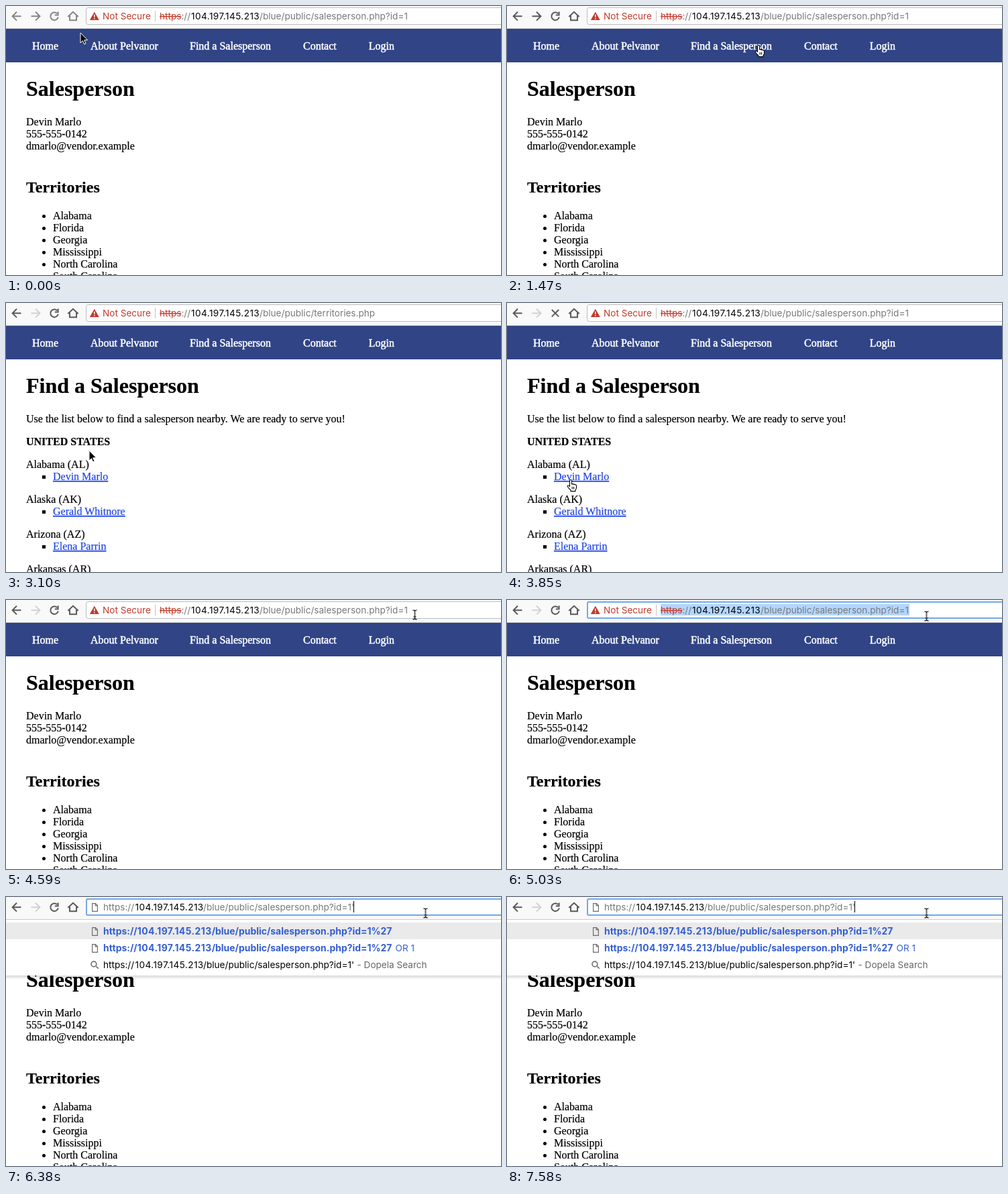
An HTML page for the animation above (8000 ms loop, 738 by 401 pixels).

```html
<!DOCTYPE html>
<html lang="en">
<head>
<meta charset="utf-8">
<title>Find a Salesperson</title>
<style>
html, body { margin: 0; width: 100%; height: 100%; overflow: hidden; background: #fff; }
svg { display: block; width: 738px; height: 401px; }

.page { font: 16px "Liberation Serif", "Times New Roman", serif; }
.page text { stroke: #000; stroke-width: .2px; }
.h1 { font-size: 32px; font-weight: bold; }
.h2 { font-size: 24px; font-weight: bold; }
.page .nav text { fill: #fff; stroke: #fff; stroke-width: .5px; }
.page .link { fill: #2145e8; stroke: #2145e8; text-decoration: underline; }
.bar { font: 13.6px Inter, "Open Sans", sans-serif; }
.ip { letter-spacing: .43px; }
.grey { fill: #787878; }
.red { fill: #c4392b; }
.strike { text-decoration: line-through; }
.match { font-size: 13.93px; font-weight: 700; }
.blue { fill: #345fd2; }
.icon { fill: none; stroke: #5a5a5a; stroke-width: 2; }
.thin { fill: none; stroke: #6e6e6e; stroke-width: 1.2; }

/* Timed parts: hidden unless a keyframe shows them */
.t { visibility: hidden; animation: 8s step-end infinite; }
.dim { animation: dim 8s step-end infinite; }
#finder { animation-name: finder; }
#sales { animation-name: sales; }
#terr { animation-name: terr; }
#reload { animation-name: reload; }
#stop { animation-name: stop; }
#fwd { animation: fwd 8s step-end infinite; }
#ring { animation-name: ring; }
#sel { animation-name: sel; }
#caret { animation-name: caret; }
#typed, #drop { animation-name: typed; }
#caret2 { animation-name: caret2; }
#arrow { animation-name: arrow; }
#hand { animation-name: hand; }
#beam { animation-name: beam; }
#cursor { animation: move 8s infinite; }

@keyframes dim { 0% { stroke: #858585; } 7.5% { stroke: #5a5a5a; } }
@keyframes fwd { 0% { stroke: #858585; } 7.5% { stroke: #5a5a5a; } 22%, 100% { stroke: #d2d2d2; } }
@keyframes finder { 31.2% { visibility: visible; } 49.8% { visibility: hidden; } }
@keyframes sales { 0%, 48.1% { visibility: visible; } 22%, 79.7% { visibility: hidden; } }
@keyframes terr { 22% { visibility: visible; } 48.1% { visibility: hidden; } }
@keyframes reload { 0%, 31.2%, 49.8% { visibility: visible; } 22%, 48.1% { visibility: hidden; } }
@keyframes stop { 22%, 48.1% { visibility: visible; } 31.2%, 49.8% { visibility: hidden; } }
@keyframes ring { 62.8% { visibility: visible; } }
@keyframes sel { 62.8% { visibility: visible; } 66.6% { visibility: hidden; } }
@keyframes caret { 66.6% { visibility: visible; } 74.1% { visibility: hidden; } }
@keyframes typed { 79.7% { visibility: visible; } }
@keyframes caret2 { 79.7%, 94.7% { visibility: visible; } 87.2% { visibility: hidden; } }
@keyframes arrow { 0%, 34.9%, 53.5% { visibility: visible; } 9%, 42.4%, 57.3% { visibility: hidden; } }
@keyframes hand { 9%, 42.4% { visibility: visible; } 34.9%, 53.5% { visibility: hidden; } }
@keyframes beam { 57.3% { visibility: visible; } }

/* The pointer advances in jumps of about 150 ms */
@keyframes move {
  0% { transform: translate(111px, 40px); animation-timing-function: steps(8); }
  14.6% { transform: translate(389px, 61px); animation-timing-function: steps(2); }
  18.3% { transform: translate(375px, 58px); }
  22% { transform: translate(375px, 58px); animation-timing-function: steps(4); }
  29.3% { transform: translate(325px, 197px); }
  33.1% { transform: translate(325px, 197px); animation-timing-function: steps(3); }
  38.7% { transform: translate(124px, 220px); animation-timing-function: steps(4); }
  46.2% { transform: translate(95px, 263px); }
  51.7% { transform: translate(95px, 263px); animation-timing-function: steps(3); }
  57.3% { transform: translate(609.5px, 22px); animation-timing-function: steps(2); }
  61.1%, 100% { transform: translate(625.5px, 24px); }
}
</style>
</head>
<body>
<svg viewBox="0 0 738 401" xmlns="http://www.w3.org/2000/svg">
  <defs>
    <linearGradient id="shade" x2="0" y2="1">
      <stop offset="0" stop-color="#000" stop-opacity=".15"/>
      <stop offset="1" stop-color="#000" stop-opacity="0"/>
    </linearGradient>
    <path id="doc" class="thin" d="M128.6 9.6h4.8l3 3v8.8h-7.8zM133.2 9.8v3h3"/>
  </defs>
  <rect width="738" height="401" fill="#fff"/>

  <g class="page">
    <text class="h1" x="30" y="134">Salesperson</text>
    <text y="178">
      <tspan x="30">Devin Marlo</tspan>
      <tspan x="30" dy="18">555-555-0142</tspan>
      <tspan x="30" dy="18">dmarlo@vendor.example</tspan>
    </text>
    <text class="h2" x="30" y="278">Territories</text>
    <path d="M56.5 313.5V410" stroke="#000" stroke-width="5" stroke-linecap="round" stroke-dasharray="0 18"/>
    <text y="318">
      <tspan x="70">Alabama</tspan>
      <tspan x="70" dy="18">Florida</tspan>
      <tspan x="70" dy="18">Georgia</tspan>
      <tspan x="70" dy="18">Mississippi</tspan>
      <tspan x="70" dy="18">North Carolina</tspan>
      <tspan x="70" dy="18">South Carolina</tspan>
    </text>
  </g>

  <g id="finder" class="page t">
    <rect y="84" width="738" height="317" fill="#fff"/>
    <text class="h1" x="30" y="134">Find a Salesperson</text>
    <text x="30" y="178">Use the list below to find a salesperson nearby. We are ready to serve you!</text>
    <text x="30" y="212" font-weight="bold">UNITED STATES</text>
    <path d="M56.5 257V400" stroke="#000" stroke-width="5" stroke-dasharray="5 47"/>
    <text x="30" y="246">Alabama (AL)</text>
    <text class="link" x="70" y="264">Devin Marlo</text>
    <text x="30" y="298">Alaska (AK)</text>
    <text class="link" x="70" y="316">Gerald Whitnore</text>
    <text x="30" y="350">Arizona (AZ)</text>
    <text class="link" x="70" y="368">Elena Parrin</text>
    <text x="30" y="402">Arkansas (AR)</text>
  </g>

  <g class="page">
    <rect y="34" width="738" height="50" fill="#304486"/>
    <g class="nav">
      <text x="39" y="65">Home</text>
      <text x="126" y="65">About Pelvanor</text>
      <text x="274" y="65">Find a Salesperson</text>
      <text x="443" y="65">Contact</text>
      <text x="540.7" y="65">Login</text>
    </g>
  </g>

  <!-- Toolbar -->
  <rect width="738" height="34" fill="#f9f9f9"/>
  <rect y="33" width="738" height="1" fill="#cacaca"/>
  <path class="icon dim" d="M22.5 15.2H10M16 8.8L9.6 15.2L16 21.6"/>
  <path id="fwd" class="icon" d="M37.5 15.2H50M44 8.8L50.4 15.2L44 21.6"/>
  <g id="reload" class="t">
    <path class="icon dim" d="M76.2 11.2A5.8 5.8 0 1 0 77.8 16.5M77.6 8.6V13.4H72.8"/>
  </g>
  <path id="stop" class="icon t" d="M66.8 10L77.2 20.4M77.2 10L66.8 20.4"/>
  <path class="icon dim" d="M92.3 16L100 8.8L107.7 16M95 14.5V21.2H105V14.5"/>

  <!-- Address field -->
  <rect x="119.5" y="2.5" width="640" height="25" rx="3" fill="#fff" stroke="#bcbcbc"/>
  <rect id="ring" class="t" x="120" y="3" width="640" height="24" rx="2" fill="#fff" stroke="#72a8e8" stroke-width="2"/>
  <rect id="sel" class="t" x="229" y="6" width="371" height="17" fill="#b3d6fd"/>
  <g class="bar">
    <path class="red" d="M131.8 8.8L138.8 21H124.8z"/>
    <path d="M131.8 12.8V16.8M131.8 18V19.5" stroke="#fff" stroke-width="1.5"/>
    <text class="red" x="144" y="20">Not Secure</text>
    <path d="M222.5 7V23" stroke="#c4c4c4"/>
    <text class="grey" x="229" y="20"><tspan class="red strike">https</tspan>://</text>
    <text class="ip" x="276" y="20">104.197.145.213</text>
    <text id="sales" class="grey t" x="378" y="20">/blue/public/salesperson.php?id=1</text>
    <text id="terr" class="grey t" x="378" y="20">/blue/public/territories.php</text>
  </g>
  <rect id="caret" class="t" x="599" y="6" width="1" height="17"/>

  <g id="typed" class="bar t">
    <rect x="122" y="5" width="616" height="20" fill="#fff"/>
    <use href="#doc"/>
    <text class="grey" x="145" y="20">https://</text>
    <text class="ip" x="192.5" y="20">104.197.145.213</text>
    <text class="grey" x="294" y="20">/blue/public/salesperson.php?id=1'</text>
  </g>
  <rect id="caret2" class="t" x="518" y="6" width="1" height="17"/>

  <!-- Suggestions -->
  <g id="drop" class="bar t">
    <rect y="34" width="738" height="83" fill="#fff"/>
    <rect y="117" width="738" height="6" fill="url(#shade)"/>
    <rect y="38" width="738" height="25" fill="#eaeaea"/>
    <use href="#doc" y="36"/>
    <use href="#doc" y="61"/>
    <path class="thin" style="stroke-width:1.6" d="M134.4 103.4L137.8 106.8M134.8 100a3.9 3.9 0 1 0 -7.8 0a3.9 3.9 0 1 0 7.8 0"/>
    <text class="blue match" x="145" y="56">https://<tspan class="ip">104.197.145.213</tspan>/blue/public/salesperson.php?id=1%27</text>
    <text class="blue match" x="145" y="81">https://<tspan class="ip">104.197.145.213</tspan>/blue/public/salesperson.php?id=1%27</text>
    <text class="blue" x="580.5" y="81">OR 1</text>
    <text x="145" y="106">https://</text>
    <text class="ip" x="192.5" y="106">104.197.145.213</text>
    <text x="294" y="106">/blue/public/salesperson.php?id=1'</text>
    <text fill="#666" x="523.5" y="106">- Dopela Search</text>
  </g>

  <g id="cursor">
    <path id="arrow" class="t" d="M0 0V15l3.4-3.3 2.3 5.3 2.3-1-2.3-5.2h4.8z" stroke="#fff"/>
    <path id="hand" class="t" fill="#fff" stroke="#000" stroke-width="1.1" stroke-linejoin="round"
      d="M-1.5 10.5V2a1.5 1.5 0 0 1 3 0V7q1.5-1 2.6.4 1.5-.8 2.4.6 2-.2 2 1.6V12q0 2-1.5 3.6V17.6H0V16q-2.5-2-4.5-5-.8-1.6.4-2 1.3-.2 2.6 1.5zM2.2 11v3.6M4.6 11v3.6"/>
    <g id="beam" class="t" fill="none">
      <path d="M0-5V5" stroke="#fff" stroke-width="3"/>
      <path d="M-3.2-7Q0-7 0-5Q0-7 3.2-7M0-5.5V5.5M-3.2 7Q0 7 0 5Q0 7 3.2 7M-2 3H2" stroke="#000" stroke-width="1.2"/>
    </g>
  </g>
</svg>
</body>
</html>
```
